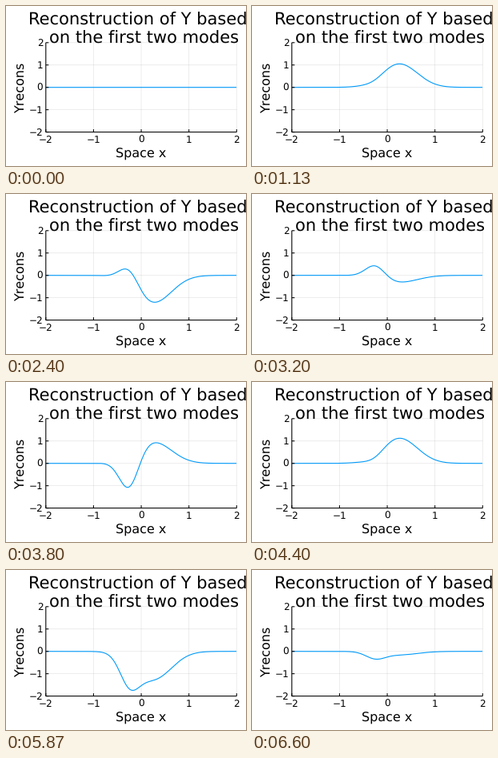
Write a matplotlib script that moves like this. It is 300 by 200 pixels and loops after 6.67 s.

```python
import numpy as np
import matplotlib.pyplot as plt
from matplotlib.animation import FuncAnimation
from matplotlib.collections import LineCollection

W, H, DPI = 300, 200, 100
STATES, TICK_MS, LOOP_MS = 100, 10, 6670
LEFT, RIGHT, TOP, BOTTOM = 49.8, 288.3, 45.8, 157.6

plt.rcParams.update({
    "font.family": "DejaVu Sans",
    "text.hinting": "none",
    "text.hinting_factor": 1,
})


def pt(px):
    return px * 72 / DPI


def px_x(v):
    return LEFT + (v + 2) * (RIGHT - LEFT) / 4


def px_y(v):
    return BOTTOM - (v + 2) * (BOTTOM - TOP) / 4


def label(x, y, text, size, ha="center", **kw):
    ax.text(x, y, text, fontsize=pt(size), ha=ha, va="baseline", **kw)


def strokes(segments, width, **kw):
    lines = LineCollection(segments, linewidths=pt(width), **kw)
    lines.set_snap(False)
    ax.add_collection(lines)


def bump(x, center, sigma):
    return np.exp(-((x - center) ** 2) / (2 * sigma ** 2))


# One axes covers the figure, measured in pixels from the top left.
fig = plt.figure(figsize=(W / DPI, H / DPI), dpi=DPI, facecolor="white")
ax = fig.add_axes([0, 0, 1, 1], xlim=(0, W), ylim=(H, 0))
ax.axis("off")

grid, frame = [], [[(LEFT, TOP), (LEFT, BOTTOM)], [(LEFT, BOTTOM), (RIGHT, BOTTOM)]]
for v in range(-2, 3):
    gx, gy = px_x(v), px_y(v)
    grid += [[(gx, TOP), (gx, BOTTOM)], [(LEFT, gy), (RIGHT, gy)]]
    frame += [[(gx, BOTTOM), (gx, BOTTOM - 3.5)], [(LEFT, gy), (LEFT + 3.5, gy)]]
    name = str(v).replace("-", "\u2212")
    label(gx, 170.8, name, 11.9)
    label(46.3, gy + 4.3, name, 11.9, ha="right")
strokes(grid, 0.7, colors="black", alpha=0.1, zorder=1)
strokes(frame, 1.05, colors="black", zorder=3)

label(164.5, 24, "Reconstruction of Y based", 20.6)
label(172.8, 46.8, "on the first two modes", 20.6)
label(168.5, 189.5, "Space x", 16.4)
label(22.3, 101.9, "Yrecons", 16.4, rotation=90, rotation_mode="anchor")

x = np.linspace(-2, 2, 401)
narrow = 1.5 * bump(x, -0.25, 0.2)
wide = 1.25 * bump(x, 0.25, 0.38)
curve, = ax.plot(px_x(x), px_y(0 * x), color="#009afa", linewidth=pt(1.1),
                 zorder=2, snap=False)
curve.set_clip_path(plt.Rectangle((LEFT, TOP), RIGHT - LEFT, BOTTOM - TOP,
                                  transform=ax.transData))


def update(tick):
    # 15 states per second, each starting on the nearest 10 ms tick
    n = int((tick + 0.5) * 0.15)
    phase = 2 * np.pi * n / STATES
    curve.set_ydata(px_y(narrow * np.sin(3 * phase) + wide * np.sin(2 * phase)))
    return curve,


anim = FuncAnimation(fig, update, frames=LOOP_MS // TICK_MS, interval=TICK_MS,
                     repeat=True, repeat_delay=0)
plt.show()
```
